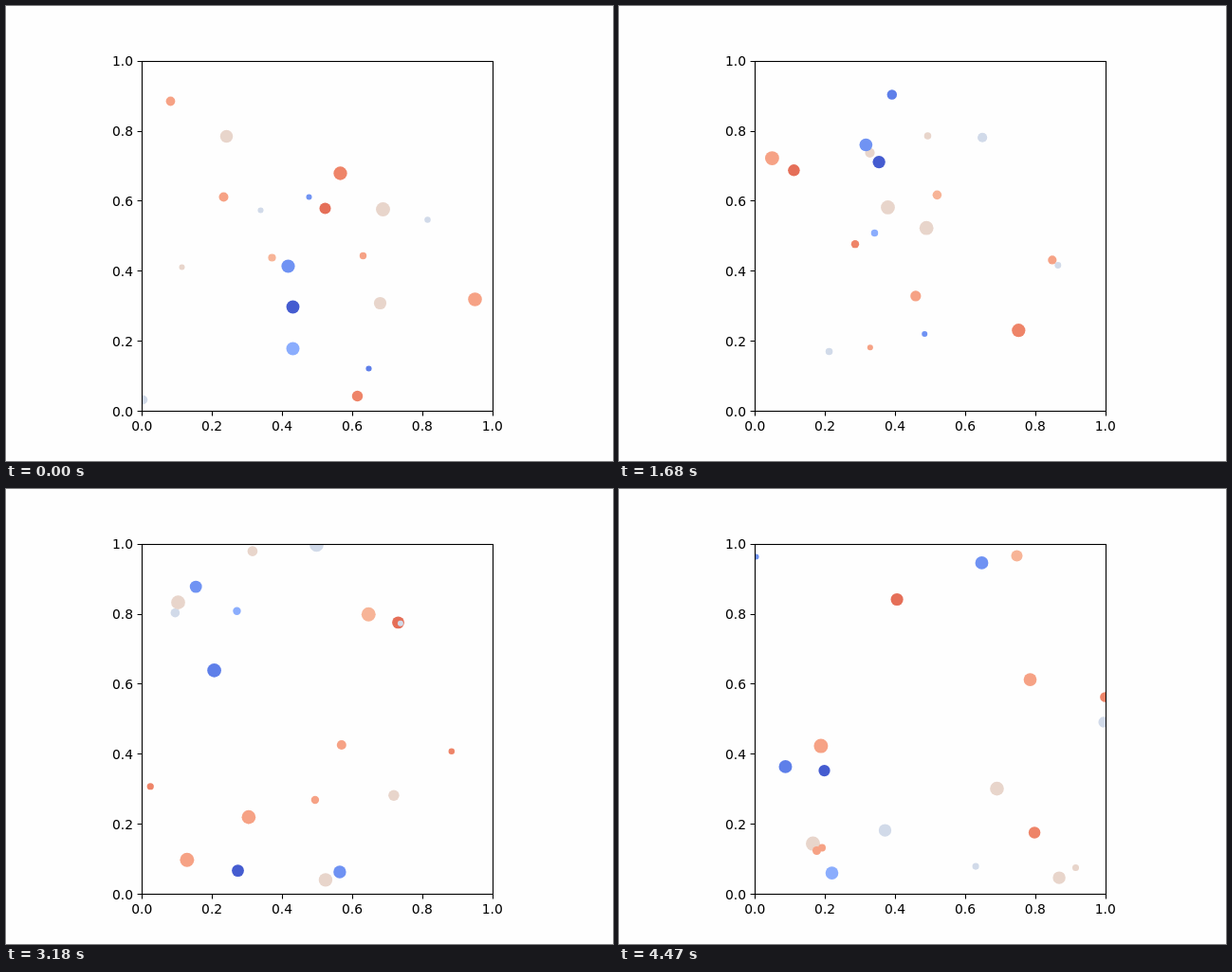
These frames come from a looping animation (640 by 480 pixels, 4500 ms). An HTML page:

```html
<!DOCTYPE html>
<html lang="en">
<head>
<meta charset="utf-8">
<title>Drifting dots</title>
<style>
  html, body { margin: 0; width: 100%; height: 100%; overflow: hidden; background: #fefefe; }
  svg { display: block; width: 640px; height: 480px; }
  text { font: 13.89px "DejaVu Sans", sans-serif; fill: #000; }
</style>
</head>
<body>
<svg viewBox="0 0 640 480">
  <clipPath id="box"><rect x="143.5" y="58.5" width="370" height="369"/></clipPath>
  <g id="dots" clip-path="url(#box)"></g>
  <g id="axes" fill="none" stroke="#000" stroke-width="1.1">
    <rect x="143.5" y="58.5" width="370" height="369"/>
  </g>
  <g id="labels"></g>
</svg>
<script>
const LOOP = 4500, SLOT = 30, STEPS = 100, MID = 0.52;
const LEFT = 143.2, TOP = 57.6, SIZE = 369.6;
const BEIGE = "#e8d5cb", PALE = "#d1dae9", PEACH = "#f6a285", CORAL = "#ee8468";

const $ = id => document.getElementById(id);
const snap = v => Math.floor(v + 0.5) + 0.5;
const wrap = (v, lo) => lo + (((v - lo) % SIZE) + SIZE) % SIZE;

function add(parent, tag, attrs, text) {
  const el = document.createElementNS("http://www.w3.org/2000/svg", tag);
  for (const name in attrs) el.setAttribute(name, attrs[name]);
  if (text) el.textContent = text;
  parent.appendChild(el);
  return el;
}

function drawAxes() {
  for (let i = 0; i <= 5; i++) {
    const label = (i / 5).toFixed(1);
    const x = LEFT + SIZE * i / 5, y = TOP + SIZE * (1 - i / 5);
    add($("axes"), "path", { d: `M${snap(x)} 427.5v4.9M143.5 ${snap(y)}h-4.9` });
    add($("labels"), "text", { x, y: 448, "text-anchor": "middle" }, label);
    add($("labels"), "text", { x: 134.1, y: Math.round(y + 5.5), "text-anchor": "end" }, label);
  }
}

// A nearly straight drift from a to c, bent to pass through b at MID.
function drift(a, b, c) {
  const bend = (b - a - (c - a) * MID) / (MID * (1 - MID));
  return t => a + (c - a) * t + bend * t * (1 - t);
}

const dots = [];

// Points may lie outside the box: dots leave one side and enter at the other.
// The area swings as a cosine with its own phase and rate.
function dot(fill, phase, rate, from, via, to) {
  const [x, y] = [0, 1].map(i => drift(from[i], via[i], to[i]));
  dots.push({ el: add($("dots"), "circle", { fill }), phase, rate, x, y });
}

dot(BEIGE, 3.1, 3.6, [185, 276], [296, 106], [398, -53]);
dot(PALE, 3.3, 1.4, [268, 216], [202, 425], [141, 616]);
dot(BEIGE, 0.2, 6.1, [397, 215], [296, 106], [204, 5]);
dot(BEIGE, -1, 3.6, [232, 138], [361, 274], [481, 400]);
dot(PEACH, 2.5, 5.9, [376, 264], [287, 324], [208, 382]);
dot(PEACH, 1.9, 0.5, [229, 202], [29, 295], [-156, 379]);
dot(PEACH, 1.95, 3.45, [173, 101], [303, -50], [433, -168]);
dot(BEIGE, -1.1, 2.1, [394, 314], [238, 172], [94, 41]);
dot(PEACH, -0.5, 0.6, [494, 310], [544, 100], [582, -98]);
dot("#f7b497", 2.3, 5.4, [280, 266], [356, 171], [419, 71]);
dot(CORAL, 0.65, 4.35, [352, 177], [206, 280], [68, 363]);
dot(CORAL, -1.55, 6.1, [370, 412], [442, 314], [512, 220]);
dot("#8badfd", 0.8, 4.55, [302, 362], [257, 191], [224, 36]);
dot("#6f92f3", 0.7, 6.45, [297, 275], [334, 373], [382, 448]);
dot("#7093f3", 3.1, 6.15, [319, 202], [234, 127], [144, 72]);
dot("#5e7fe9", 2.95, 4.15, [382, 383], [255, 504], [175, 663]);
dot("#455cd0", 0.85, 0.5, [302, 318], [261, 106], [216, -72]);
dot("#e56f58", -1.4, 0.3, [336, 214], [122, 159], [-77, 117]);
dot(PALE, 2.75, 4.55, [444, 226], [358, 104], [280, -9]);
dot(PALE, 2, 1.7, [144, 416], [72, 216], [6, 29]);

// Two steps every three slots, with one short step midway and one at the end.
function progress(ms) {
  const n = Math.floor((ms % LOOP) / SLOT);
  return Math.floor((2 * n + (n > 78) + (n > 148)) / 3) / STEPS;
}

function draw(t) {
  for (const { el, phase, rate, x, y } of dots) {
    el.setAttribute("cx", wrap(x(t) + 0.5, LEFT).toFixed(2));
    el.setAttribute("cy", wrap(y(t) - 0.5, TOP).toFixed(2));
    el.setAttribute("r", Math.sqrt(32.5 + 23.5 * Math.cos(phase + rate * t)).toFixed(2));
  }
}

drawAxes();
draw(0);
let start;
requestAnimationFrame(function tick(now) {
  if (start === undefined) start = now;
  draw(progress(Math.max(0, now - start)));
  requestAnimationFrame(tick);
});
</script>
</body>
</html>
```
